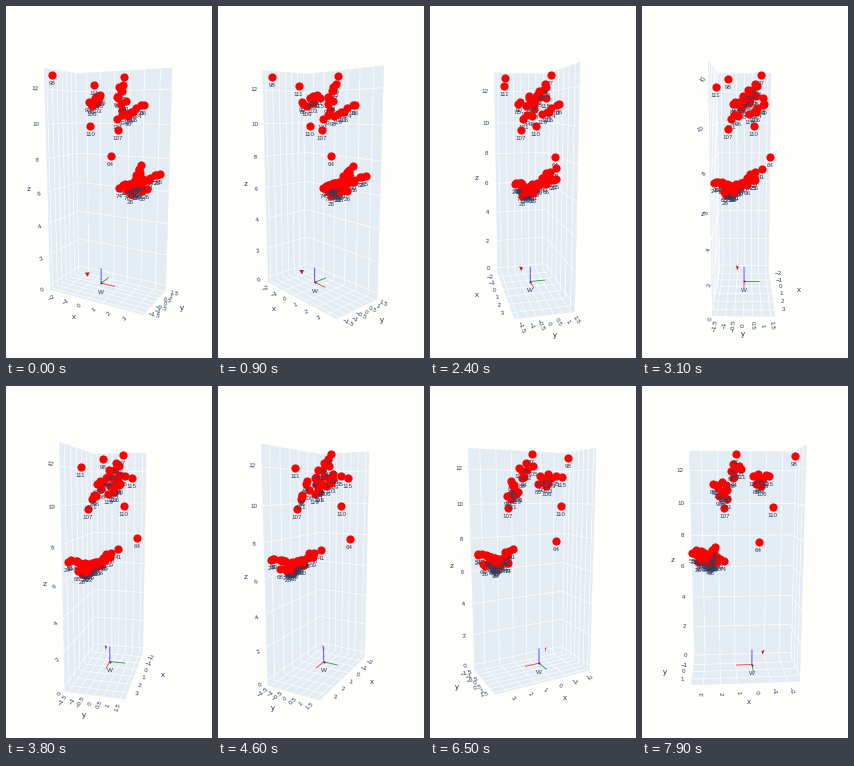
Animation, 206 px wide and 352 px high, one loop 8000 ms. Source, as a matplotlib script:

```python
import numpy as np
import matplotlib.pyplot as plt
from matplotlib.animation import FuncAnimation
from matplotlib.collections import LineCollection, PolyCollection

W, H, DPI = 206, 352, 100
FRAMES, STEP = 80, 100
PX = 72 / DPI

# Camera and box, in data units
FOCAL, DIST, ELEV = 390, 23.4, 0.185
CX, CY = 102, 179
MID = np.array([0.5, 0.0, 6.4])
HALF = np.array([3.2, 1.72, 6.75])
LO, HI = MID - HALF, MID + HALF
INK, PANEL, PAPER = "#2a3f5f", "#e3ebf3", "#fefefb"


def azimuth(i):
    t = i * STEP / 1000
    return np.radians(-61 + 20.6 * t - 0.25 * t * t)


def project(pts, phi):
    """Return screen x, screen y and depth for data points."""
    x, y, z = (np.asarray(pts, float) - MID).T
    side = y * np.cos(phi) - x * np.sin(phi)
    near = x * np.cos(phi) + y * np.sin(phi)
    depth = DIST - near * np.cos(ELEV) - z * np.sin(ELEV)
    up = z * np.cos(ELEV) - near * np.sin(ELEV)
    return np.c_[CX + FOCAL * side / depth, CY - FOCAL * up / depth, depth]


def flat(pts, phi):
    return project(pts, phi)[:, :2]


def make_points():
    """A few lone points, plus strands scattered between two ends."""
    rng = np.random.default_rng(4)

    def strand(start, end, n, spread):
        t = np.linspace(0, 1, n)[:, None]
        noise = rng.normal(0, 1, (n, 3)) * spread * (1, 1, 0.6)
        return np.array(start) * (1 - t) + np.array(end) * t + noise

    lone = {98: (-2.62, -1.07, 12.82), 110: (-1.1, 0.6, 9.87),
            107: (1.63, -0.88, 9.75), 64: (-0.2, 1.6, 7.98),
            87: (1.02, 0.95, 12.73), 111: (0.55, -1.63, 12.12)}
    high = [strand((-0.35, -0.5, 11.1), (-0.6, 1.0, 11.8), 10, 0.2),
            strand((0.9, 0.7, 12.3), (1.5, -0.3, 11), 9, 0.2),
            strand((2.05, 1.15, 11.1), (1.7, -0.65, 10.3), 9, 0.15)]
    base = (2.5, -0.8, 6.45)
    low = [strand((3.5, -1.45, 7.15), (1.8, -0.9, 6.6), 12, 0.1),
           strand((2.9, -1.0, 6.5), (2.1, -0.4, 6.5), 20, 0.18),
           strand(base, (2.2, 0.9, 7.65), 11, 0.1),
           strand(base, (3.4, 0.62, 7.25), 12, 0.12)]
    high, low = np.concatenate(high), np.concatenate(low)
    top_ids = [n for n in range(81, 125) if n not in lone]
    low_ids = [n for n in range(10, 81) if n not in lone]
    ids = [*lone, *rng.choice(top_ids, len(high), False),
           *rng.choice(low_ids, len(low), False)]
    return ids, np.concatenate([list(lone.values()), high, low])


fig = plt.figure(figsize=(W / DPI, H / DPI), dpi=DPI, facecolor=PAPER)
ax = fig.add_axes([0, 0, 1, 1])
ax.set(xlim=(0, W), ylim=(H, 0))
ax.axis("off")


def label(text="", size=6.3):
    return ax.text(0, 0, text, fontsize=size * PX, color=INK, ha="center",
                   va="center", family="Liberation Sans")


panels = ax.add_collection(PolyCollection([], facecolors=PANEL,
                                          edgecolors=PANEL, linewidths=0.3))
grid = ax.add_collection(LineCollection([], colors="white",
                                        linewidths=0.7 * PX, zorder=1.5))
triad = ax.add_collection(LineCollection([], linewidths=0.8 * PX, zorder=2,
                                         colors=["red", "green", "blue"],
                                         alpha=0.8))
cone = ax.add_collection(PolyCollection([], facecolors="#c01838", zorder=2))
origin, = ax.plot([], [], "o", ms=2 * PX, mew=0, color="#a01030", zorder=2.1)
origin_tag = label("W")
ticks = [label() for _ in range(22)]
titles = [label(c, 8) for c in "xyz"]

ids, points = make_points()
dots = [ax.plot([], [], "o", ms=8.2 * PX, mew=0, color="red")[0] for _ in ids]
tags = [label(str(n)) for n in ids]


def quad(axis, at):
    """Four corners of the box face where one axis is fixed."""
    a, b = [k for k in range(3) if k != axis]
    out = np.tile(LO, (4, 1))
    out[:, axis] = at
    out[1:3, a] = HI[a]
    out[2:, b] = HI[b]
    return out


def grid_lines(axis, at, values):
    """Grid lines on the face where one axis is fixed."""
    a, b = [k for k in range(3) if k != axis]
    for run, fixed in ((a, b), (b, a)):
        for v in values[fixed]:
            p = np.empty((2, 3))
            p[:, axis], p[:, fixed] = at, v
            p[:, run] = LO[run], HI[run]
            yield p


def outward(base, direction, phi):
    """Screen point of base and the unit screen direction away from the box."""
    p, q = flat([base, np.add(base, direction)], phi)
    return p, (q - p) / np.hypot(*(q - p))


def draw(i):
    phi = azimuth(i)
    front = 1 if np.sin(phi) > 0 else -1
    y_front, y_back = (HI[1], LO[1]) if front > 0 else (LO[1], HI[1])

    # The y ticks thin out when that axis is short on screen
    ends = flat([(HI[0], LO[1], LO[2]), (HI[0], HI[1], LO[2])], phi)
    dense = np.hypot(*(ends[1] - ends[0])) > 30
    values = [np.arange(-2, 4), np.arange(-3, 4) / 2 if dense
              else np.arange(-1, 2), np.arange(0, 13, 2)]

    faces = [(0, LO[0]), (1, y_back), (2, LO[2])]
    panels.set_verts([flat(quad(*f), phi) for f in faces])
    grid.set_segments([flat(s, phi) for f in faces
                       for s in grid_lines(*f, values)])

    # Axes sit on the front floor edges and the leftmost upright edge
    x_left = HI[0] if front > 0 else LO[0]
    anchors = [(MID[0], y_front, LO[2]), (HI[0], MID[1], LO[2]),
               (x_left, LO[1], MID[2])]
    aways = [(0, front, 0), (1, 0, 0),
             (1, 0, 0) if front > 0 else (0, -1, 0)]
    pool = iter(ticks)
    for axis, (anchor, away) in enumerate(zip(anchors, aways)):
        p, d = outward(anchor, away, phi)
        gap = 20 if axis == 2 else 18 + 10 * abs(d[0])
        titles[axis].set_position(p + gap * d)
        for v in values[axis]:
            base = list(anchor)
            base[axis] = v
            p, d = outward(base, away, phi)
            angle = (-np.degrees(np.arctan2(d[1], d[0])) + 90) % 180 - 90
            next(pool).set(position=p + 9.5 * d, rotation=angle,
                           text=f"{v:g}".replace("-", "\u2212"))
    for t in pool:
        t.set_text("")

    triad.set_segments([flat([(0, 0, 0), e], phi) for e in np.eye(3)])
    o = flat([(0, 0, 0)], phi)[0]
    origin.set_data([o[0]], [o[1]])
    origin_tag.set_position(o + (0, 9))
    tip = np.array([-0.72, -0.45, 0.45])
    cone.set_verts([flat([tip, tip + (-0.15, -0.1, 0.28),
                          tip + (0.08, 0.1, 0.28)], phi)])

    for (x, y, depth), dot, tag in zip(project(points, phi), dots, tags):
        dot.set_data([x], [y])
        dot.set_zorder(50 - depth)
        tag.set_position((x, y + 8.5))
        tag.set_zorder(50 - depth - 0.001)
    return []


anim = FuncAnimation(fig, draw, frames=FRAMES, interval=STEP,
                     init_func=lambda: draw(0), repeat=True, repeat_delay=0,
                     blit=False)
plt.show()
```
